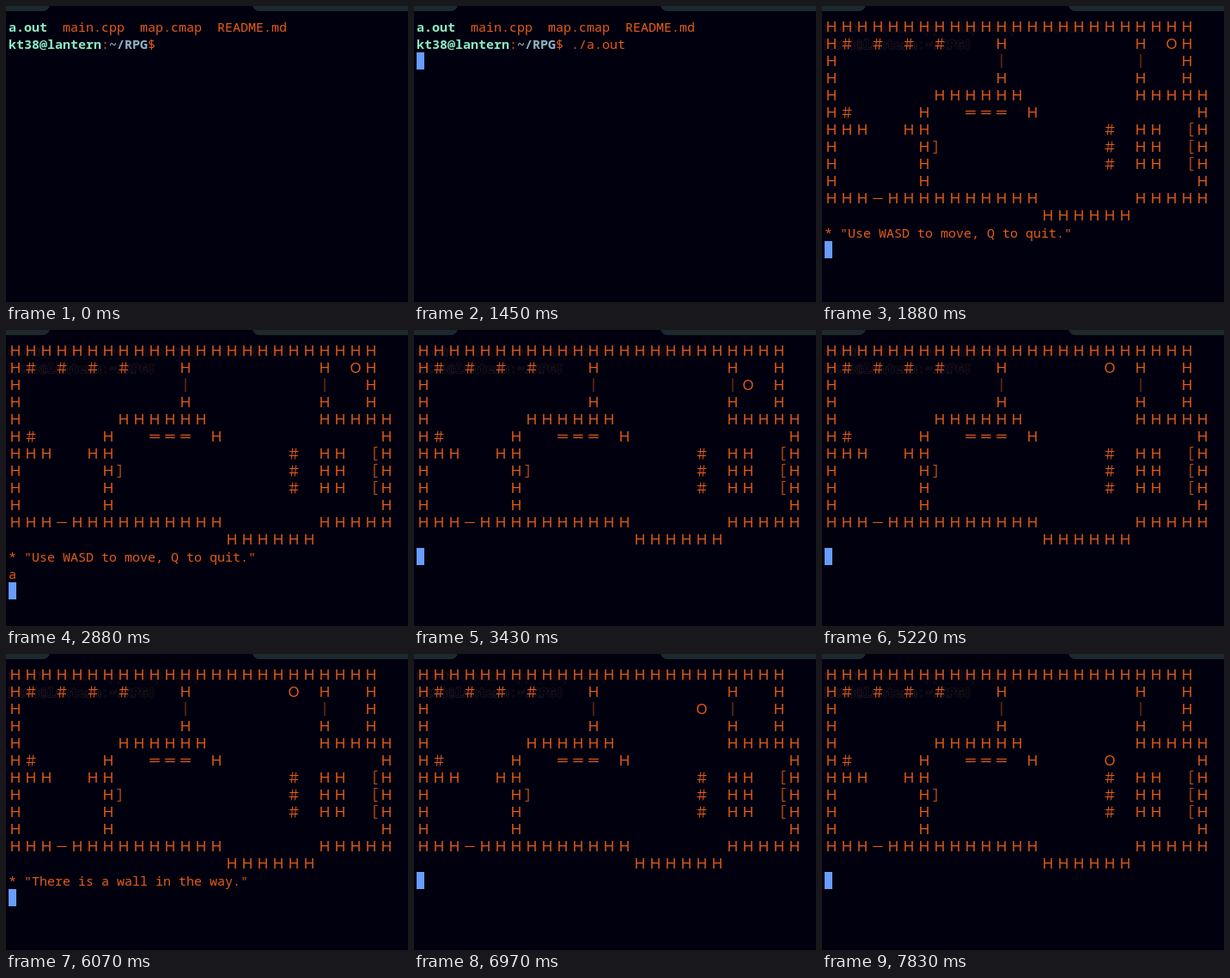
These frames come from a looping animation (468x345 px, 8000 ms). An HTML page with a canvas:

```html
<!DOCTYPE html>
<html lang="en">
<head>
<meta charset="utf-8">
<title>Terminal game</title>
<style>
  html, body { margin: 0; width: 100%; height: 100%; overflow: hidden; background: #00000f; }
  canvas { display: block; }
</style>
</head>
<body>
<canvas id="stage" width="468" height="345"></canvas>
<script>
const ctx = document.getElementById("stage").getContext("2d");
const LOOP = 8000;
const CELL_W = 9, CELL_H = 20, LEFT = 3, TOP = 14, BASELINE = 16;
const COLORS = {
  back: "#00000f", text: "#e65c17", green: "#8cecc4",
  path: "#93b5c6", cursor: "#689cff", tab: "#1c292d"
};
const MONO = '15px "Noto Sans Mono", "DejaVu Sans Mono", monospace';
const WIDE = '16px "Noto Sans CJK JP", "Noto Sans CJK SC", "Noto Sans CJK", sans-serif';

const MAP = [
  "HHHHHHHHHHHHHHHHHHHHHHHH",
  "H# # # #   H        H  H",
  "H          |        |  H",
  "H          H        H  H",
  "H      HHHHHH       HHHHH",
  "H#    H  === H          H",
  "HHH  HH           # HH [H",
  "H     H]          # HH [H",
  "H     H           # HH [H",
  "H     H                 H",
  "HHH-HHHHHHHHHH      HHHHH",
  "              HHHHHH"
];

// Text runs of the shell: column, row, text, colour, bold
const SHELL = [
  [0, 0, "a.out", COLORS.green, true],
  [7, 0, "main.cpp", COLORS.text],
  [17, 0, "map.cmap", COLORS.text],
  [27, 0, "README.md", COLORS.text],
  [0, 1, "kt38@lantern", COLORS.green, true],
  [12, 1, ":", COLORS.text],
  [13, 1, "~/RPG", COLORS.path, true],
  [18, 1, "$", COLORS.text]
];
const COMMAND = "./a.out";
const COMMAND_COL = 20;

// Each step changes part of the state: player and cursor are [column, row],
// line and next are the two text rows under the map.
const STEPS = [
  [0, { typed: 0, cursor: null, player: null, line: "", next: "" }],
  [160, { cursor: [20, 1] }],
  [510, { typed: 1, cursor: [21, 1] }],
  [630, { typed: 3, cursor: [23, 1] }],
  [1230, { typed: 7, cursor: null }],
  [1430, { cursor: [27, 1] }],
  [1450, { cursor: [0, 2] }],
  [1880, { player: [22, 1], line: '* "Use WASD to move, Q to quit."', cursor: [0, 13] }],
  [2480, { cursor: null }],
  [2680, { next: "a", cursor: [1, 13] }],
  [2880, { cursor: [0, 14] }],
  [3130, { player: [21, 1], line: "", next: "", cursor: [0, 12] }],
  [3150, { line: "s", cursor: [1, 12] }],
  [3430, { player: [21, 2], line: "", cursor: [0, 12] }],
  [3860, { line: "a", cursor: null }],
  [3880, { cursor: [1, 12] }],
  [4340, { player: [20, 2], line: "", cursor: [0, 12] }],
  [4770, { line: "a", cursor: [1, 12] }],
  [4810, { player: [19, 2], line: "", cursor: [0, 12] }],
  [4960, { line: "a", cursor: [1, 12] }],
  [5020, { player: [18, 2], line: "", cursor: [0, 12] }],
  [5100, { line: "w", cursor: [1, 12] }],
  [5160, { cursor: [0, 13] }],
  [5220, { player: [18, 1], line: "", cursor: [0, 12] }],
  [5500, { line: "w", cursor: [1, 12] }],
  [5660, { cursor: [0, 13] }],
  [6070, { line: '* "There is a wall in the way."' }],
  [6370, { cursor: null }],
  [6670, { next: "s", cursor: [1, 13] }],
  [6970, { player: [18, 2], line: "", next: "", cursor: [0, 12] }],
  [7200, { line: "s", cursor: [1, 12] }],
  [7260, { player: [18, 3], line: "", cursor: [0, 12] }],
  [7520, { line: "s", cursor: [1, 12] }],
  [7680, { cursor: [0, 13] }],
  [7720, { player: [18, 4], line: "", cursor: [0, 12] }],
  [7780, { line: "s", cursor: [1, 12] }],
  [7830, { player: [18, 5], line: "", cursor: [0, 12] }]
];

const stateAt = time =>
  Object.assign({}, ...STEPS.filter(([start]) => start <= time).map(step => step[1]));

const cellX = col => LEFT + col * CELL_W;
const cellY = row => TOP + row * CELL_H;

function write(col, row, text, color = COLORS.text, bold = false) {
  ctx.font = (bold ? "bold " : "") + MONO;
  ctx.fillStyle = color;
  ctx.fillText(text, cellX(col), cellY(row) + BASELINE);
}

function writeWide(col, row, char) {
  ctx.font = WIDE;
  ctx.fillStyle = COLORS.text;
  const wide = String.fromCharCode(char.charCodeAt(0) + 0xfee0);
  ctx.fillText(wide, cellX(col * 2), cellY(row) + BASELINE);
}

// Faint edges of the shell text that stay behind the map
function drawResidue() {
  ctx.lineWidth = 1;
  for (const [col, row, text, , bold] of SHELL) {
    ctx.font = (bold ? "bold " : "") + MONO;
    ctx.strokeStyle = bold ? "rgba(150, 105, 80, 0.32)" : "rgba(190, 90, 45, 0.22)";
    ctx.strokeText(text, cellX(col), cellY(row) + BASELINE);
    write(col, row, text, COLORS.back, bold);
  }
}

function drawMap(player) {
  MAP.forEach((line, row) => [...line].forEach((char, col) => {
    const covered = col === player[0] && row === player[1];
    if (char !== " " && !covered) writeWide(col, row, char);
  }));
  writeWide(player[0], player[1], "O");
}

function drawTabs() {
  ctx.fillStyle = COLORS.tab;
  ctx.beginPath();
  ctx.roundRect(-20, -10, 71, 16, [0, 0, 8, 0]);
  ctx.roundRect(287, -10, 200, 16, [0, 0, 0, 8]);
  ctx.fill();
}

function draw(time) {
  const { typed, cursor, player, line, next } = stateAt(time);
  ctx.fillStyle = COLORS.back;
  ctx.fillRect(0, 0, 468, 345);
  drawTabs();
  if (player) {
    drawResidue();
    drawMap(player);
    write(0, 12, line);
    write(0, 13, next);
  } else {
    SHELL.forEach(run => write(...run));
    write(COMMAND_COL, 1, COMMAND.slice(0, typed));
  }
  if (cursor) {
    ctx.fillStyle = COLORS.cursor;
    ctx.fillRect(cellX(cursor[0]), cellY(cursor[1]), CELL_W, CELL_H);
  }
}

const began = performance.now();
function tick() {
  draw((performance.now() - began) % LOOP);
  requestAnimationFrame(tick);
}
tick();
</script>
</body>
</html>
```
